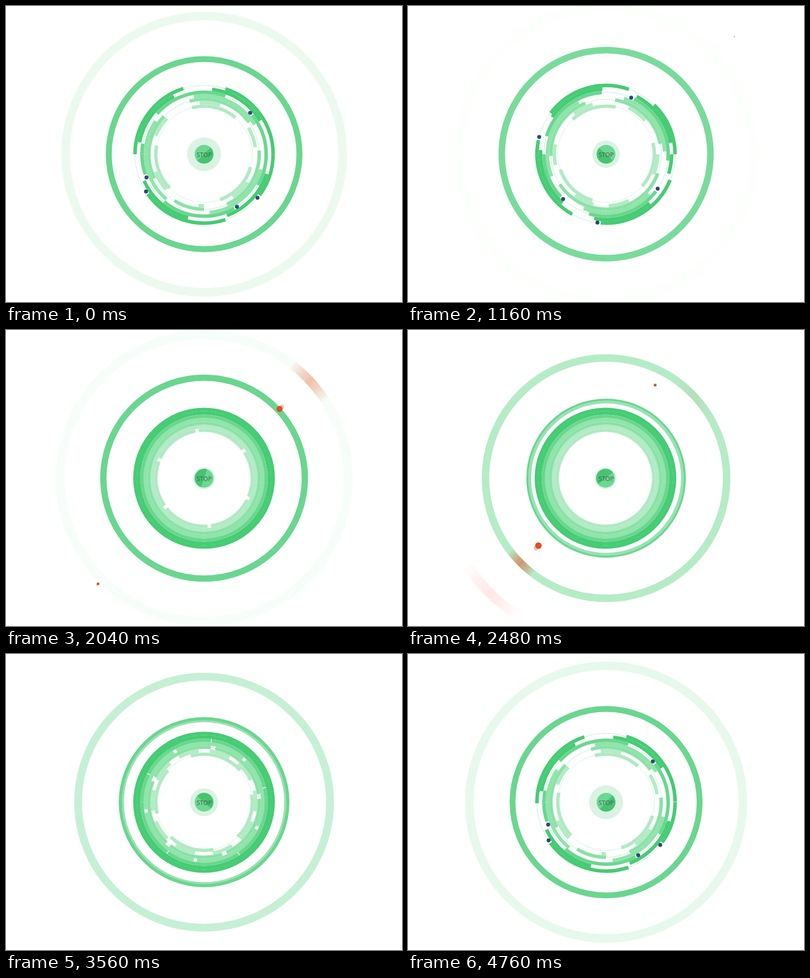
An HTML page with a canvas for the animation above (4.8 s loop, 800 by 600 pixels).

```html
<!DOCTYPE html>
<html lang="en">
<head>
<meta charset="utf-8">
<title>Shield dial</title>
<style>
  html, body { margin: 0; width: 100%; height: 100%; overflow: hidden; background: #fff; }
  canvas { display: block; width: 800px; height: 600px; }
</style>
</head>
<body>
<canvas id="stage" width="800" height="600"></canvas>
<script>
const LOOP = 4800, PULSE = 960, FIRST_PULSE = 368, SPEED = 0.09375;
const GREEN = '#46cc74', MID = '#6dd891', SOFT = '#90e4ab', PALE = '#b4ebc6';
const RED = '#e04e26', RAD = Math.PI / 180;
const ctx = document.getElementById('stage').getContext('2d');

const clamp = x => Math.min(1, Math.max(0, x));
const sine = x => (1 - Math.cos(Math.PI * clamp(x))) / 2;
const cubic = x => {
  x = clamp(x);
  return x < 0.5 ? 4 * x ** 3 : 1 - 4 * (1 - x) ** 3;
};

function arc(r, width, color, from = 0, to = 360) {
  ctx.beginPath();
  ctx.arc(0, 0, r, from * RAD, to * RAD);
  ctx.lineWidth = width;
  ctx.strokeStyle = color;
  ctx.stroke();
}

function disc(x, y, r, color) {
  ctx.beginPath();
  ctx.arc(x, y, Math.max(0, r), 0, 2 * Math.PI);
  ctx.fillStyle = color;
  ctx.fill();
}

// ---- dial: dashed bands, outside to inside, in degrees from each seam ----
// turns = dash periods travelled per loop.
const bands = [
  { color: GREEN, seam: 0, dash: 72.5, gap: 35.5, start: 288, turns: 1 },
  { color: GREEN, seam: 0, dash: 52, gap: 34.5, start: 277, turns: 1 },
  { color: MID, seam: 180, dash: 69, gap: 31, start: 241, turns: -1 },
  { color: SOFT, seam: 180, dash: 69.5, gap: 45.5, start: 195, turns: 1 },
  { color: SOFT, seam: 90, dash: 69.5, gap: 31.5, start: 266, turns: 1 },
  { color: PALE, seam: 90, dash: 23, gap: 41, start: 303, turns: 2 },
  { color: PALE, seam: 270, dash: 55, gap: 65, start: 345.5, turns: -1 }
];

// Gaps close from the outside in and open from the inside out.
function pose(i, t) {
  const b = bands[i];
  const shut = sine((t - 940 - 100 * i) / 600);
  const open = cubic((t - 3544 + 64 * i) / 800);
  const gap = b.gap * (1 - shut + open);
  return {
    ...b, gap, r: 139.5 - 7 * i, step: b.dash + gap,
    phase: b.start + b.turns * (b.dash + b.gap) * t / LOOP
  };
}

function drawBand({ color, seam, dash, gap, step, phase, r }) {
  if (gap < 0.3) return arc(r, 7.2, color);
  const first = phase - step * Math.ceil((phase + dash) / step);
  for (let a = first; a < 360; a += step) {
    const from = Math.max(0, a), to = Math.min(360, a + dash);
    if (to > from) arc(r, 7.2, color, seam + from, seam + to);
  }
}

// Navy beads ride in the gaps beside chosen dashes.
function drawBeads({ seam, gap, step, phase, turns, r }, dashes, side, t) {
  const size = 4 * clamp(gap / 12);
  if (size < 0.3) return;
  for (const k of dashes) {
    const n = t > LOOP / 2 ? k - turns : k;
    const a = (seam + phase + n * step + side) * RAD;
    disc(r * Math.cos(a), r * Math.sin(a), size, '#33467a');
  }
}

function drawDial(t) {
  const poses = bands.map((_, i) => pose(i, t));
  poses.forEach(drawBand);
  ctx.setLineDash([1.4, 2.4]);
  for (let i = 0; i < 7; i += 2) arc(poses[i].r, 1, i < 6 ? GREEN : '#7edb9c');
  ctx.setLineDash([]);
  drawBeads(poses[0], [-3, -2], 75.2, t);
  drawBeads(poses[2], [-1, 0, 1], -3, t);
}

// ---- pulses: two stacked rings, the upper one thinner at first ----
const pulseRadius = (n, t) => 143 + SPEED * (t - FIRST_PULSE - n * PULSE);
const pulseAlpha = r => 0.8 * clamp((310 - r) / 100) ** 1.3;

function drawPulse(n, t) {
  const r = pulseRadius(n, t);
  if (r < 143 || r > 310) return;
  const width = 0.06 * r;
  const upper = width * (1 - clamp((194.75 - r) / 56));
  ctx.globalAlpha = 1 - Math.sqrt(1 - pulseAlpha(r));
  arc(r - width / 2, width, GREEN);
  arc(r - upper / 2, upper, GREEN);
  ctx.globalAlpha = 1;
}

// ---- shots: fall in, glow where they cross a pulse, bounce off the dial ----
const FLIGHT = 1132, BOUNCE = 420, GLOW = 450;
const shots = [
  { start: 1083, angle: -42.6, side: -1 },
  { start: 1479, angle: 135, side: 1 }
];
const shotRadius = age => 353 - 1.59e-4 * age * age;

const hits = [];
for (const { start, angle } of shots) {
  for (let n = -2; n < 5; n++) {
    for (let age = 0; age < FLIGHT; age += 5) {
      const r = 0.97 * pulseRadius(n, start + age);
      if (r > 140 && r < 300 && r >= shotRadius(age)) {
        hits.push({ n, time: start + age, angle });
        break;
      }
    }
  }
}

function drawGlow({ n, time, angle }, t) {
  const age = t - time, layers = 12;
  if (age < 0 || age > GLOW) return;
  const r = pulseRadius(n, t), half = 5 + age * 0.02;
  ctx.globalAlpha = 0.075 * (1 - age / GLOW);
  for (let i = 1; i <= layers; i++) {
    const spread = half * i / layers;
    arc(0.97 * r, 0.06 * r, RED, angle - spread, angle + spread);
  }
  ctx.globalAlpha = 1;
}

function drawShot({ start, angle, side }, t) {
  const age = t - start, c = Math.cos(angle * RAD), s = Math.sin(angle * RAD);
  if (age < 0 || age > FLIGHT + BOUNCE) return;
  if (age < FLIGHT) {
    const r = shotRadius(age), size = 0.9 + 7.2 * (age / FLIGHT) ** 2;
    ctx.globalAlpha = 0.35;
    disc((r + size) * c, (r + size) * s, size * 0.8, RED);
    ctx.globalAlpha = 1;
    disc(r * c, r * s, size, RED);
  } else {
    const out = age - FLIGHT;
    disc(149 * c + side * 0.04 * out, 149 * s + side * 0.33 * out,
      8 * (1 - out / BOUNCE), '#cb5a32');
  }
}

function shake(t) {
  return shots.reduce((sum, { start, side }) => {
    const age = t - start - FLIGHT;
    return age > 0 ? sum + side * 5 * Math.exp(-age / 180) : sum;
  }, 0);
}

// ---- button ----
function drawButton(t) {
  const turn = 2 * Math.PI * t / LOOP, dark = turn + Math.PI / 4;
  disc(0, 0, 28 + 6.2 * Math.cos(turn + 0.1), '#daf3e3');
  disc(0, 0, 19, MID);
  ctx.beginPath();
  ctx.arc(0, 0, 19, dark - Math.PI / 2, dark + Math.PI / 2);
  ctx.fillStyle = '#47c371';
  ctx.fill();
}

function draw(t) {
  ctx.setTransform(1, 0, 0, 1, 0, 0);
  ctx.fillStyle = '#fff';
  ctx.fillRect(0, 0, 800, 600);
  ctx.translate(400.2, 300.3);
  for (let n = -2; n < 5; n++) drawPulse(n, t);
  hits.forEach(h => drawGlow(h, t));
  ctx.save();
  ctx.translate(shake(t) - 0.1, 0.2);
  drawDial(t);
  drawButton(t);
  ctx.restore();
  shots.forEach(s => drawShot(s, t));
  ctx.fillStyle = '#46585a';
  ctx.font = '12.5px "Open Sans", "Noto Sans", sans-serif';
  ctx.textAlign = 'center';
  ctx.fillText('STOP', 0.2, 5.5);
}

function tick() {
  draw(performance.now() % LOOP);
  requestAnimationFrame(tick);
}
tick();
</script>
</body>
</html>
```
